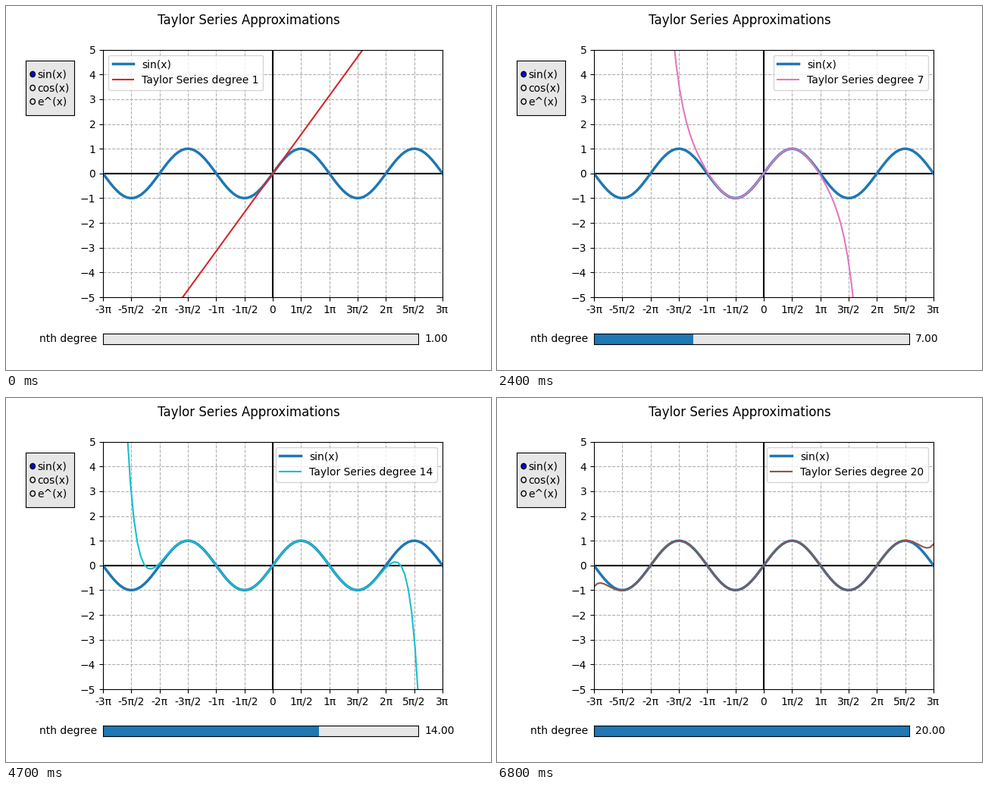
Animation of 640 by 480 pixels, one loop 7.3 s. Source, as a matplotlib script:

```python
import math

import matplotlib.pyplot as plt
import numpy as np
from matplotlib.animation import FuncAnimation
from matplotlib.patches import Circle

MAX_DEGREE = 20
PANEL = "0.9"
TICK_MS = 100

# How many ticks each degree stays on screen, from degree 1 upwards
HOLDS = [5] + [5, 2] * 9 + [5]
STARTS = np.cumsum([0] + HOLDS[:-1])
LINE_COLORS = [f"C{digit}" for digit in "32148967253849617235"]

x = np.linspace(-3 * np.pi, 3 * np.pi, 100)


def taylor_sin(degree):
    """Sum the odd powers of the sine series; an even degree adds one term."""
    return sum((-1) ** k * x ** (2 * k + 1) / math.factorial(2 * k + 1)
               for k in range(degree // 2 + 1))


def pi_label(halves):
    if halves == 0:
        return "0"
    return f"{halves // 2}π" if halves % 2 == 0 else f"{halves}π/2".replace("-1π", "-1π")


def panel(rect):
    axes = fig.add_axes(rect, facecolor=PANEL)
    axes.set(xticks=[], yticks=[])
    return axes


plt.rcParams["font.family"] = "DejaVu Sans"
fig = plt.figure(figsize=(6.4, 4.8), dpi=100)
fig.suptitle("Taylor Series Approximations")

# Plot
ax = fig.add_axes([0.2, 0.2, 0.7, 0.68])
ax.set(xlim=(x[0], x[-1]), ylim=(-5, 5), yticks=range(-5, 6))
halves = range(-6, 7)
ax.set_xticks([h * np.pi / 2 for h in halves],
              [pi_label(h) if h != 1 else "1π/2" for h in halves])
ax.grid(linestyle="--")
ax.axhline(0, color="black")
ax.axvline(0, color="black")
ax.plot(x, np.sin(x), color="C0", linewidth=2.5, label="sin(x)")
series, = ax.plot(x, x)

# Function chooser
chooser = panel([0.04, 0.7, 0.1, 0.15])
for y, name in zip((0.75, 0.5, 0.25), ("sin(x)", "cos(x)", "e^(x)")):
    face = "blue" if name == "sin(x)" else PANEL
    chooser.add_patch(Circle((0.15, y), 0.05, facecolor=face, edgecolor="black",
                             transform=chooser.transAxes))
    chooser.text(0.25, y, name, va="center", transform=chooser.transAxes)

# Degree slider
slider = panel([0.2, 0.07, 0.65, 0.03])
slider.set(xlim=(1, MAX_DEGREE), ylim=(0, 1))
fill = slider.axvspan(1, 1, facecolor="C0", edgecolor="none")
slider.text(-0.02, 0.5, "nth degree", ha="right", va="center",
            transform=slider.transAxes)
value = slider.text(1.02, 0.5, "", va="center", transform=slider.transAxes)


def update(tick):
    degree = int(np.searchsorted(STARTS, tick, side="right"))
    series.set_ydata(taylor_sin(degree))
    series.set_color(LINE_COLORS[degree - 1])
    series.set_label(f"Taylor Series degree {degree}")
    ax.legend(loc="best")
    fill.set_width(degree - 1)
    value.set_text(f"{degree:.2f}")


anim = FuncAnimation(fig, update, frames=sum(HOLDS), interval=TICK_MS,
                     init_func=lambda: update(0), repeat=True, repeat_delay=0)
plt.show()
```
